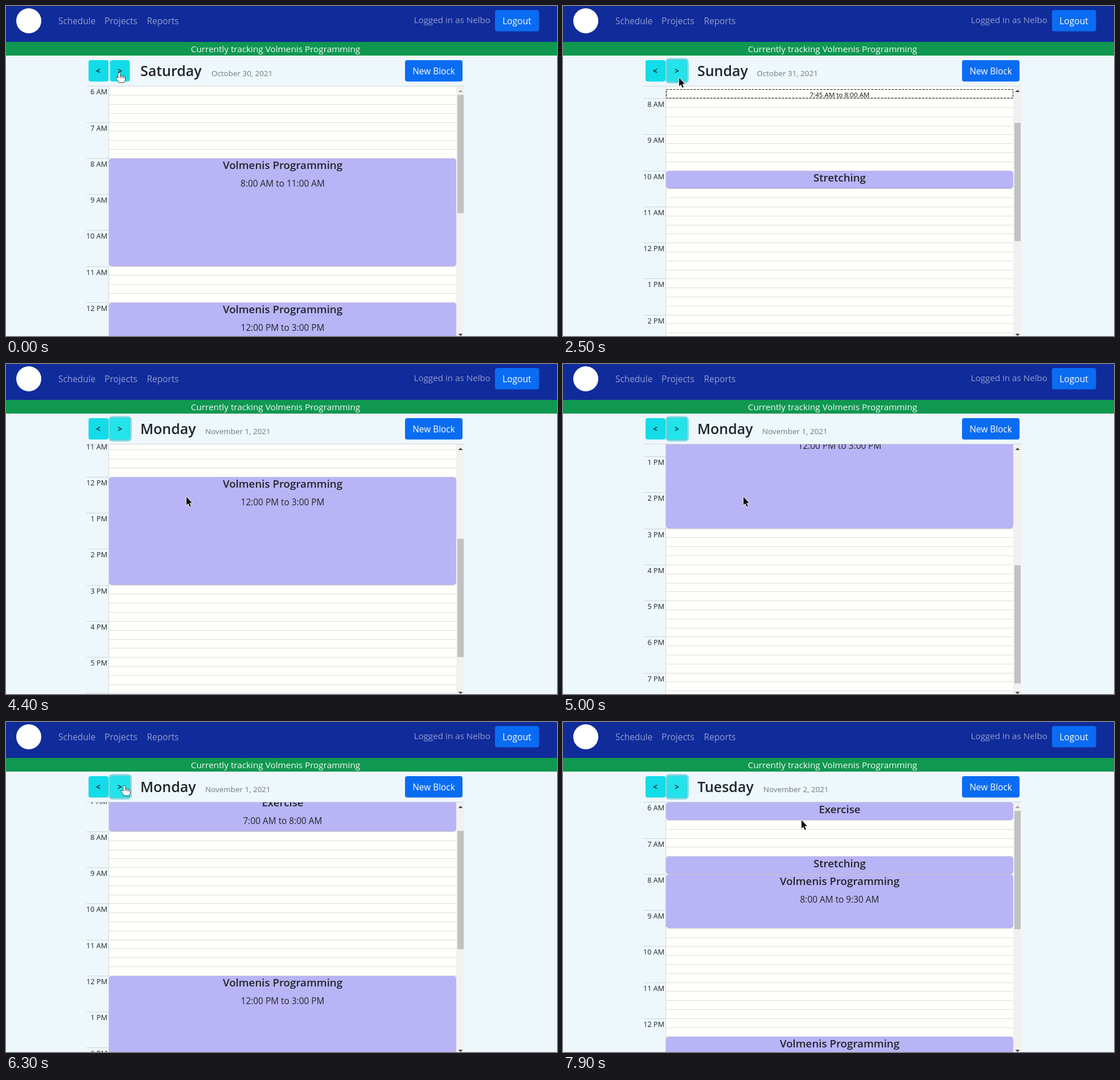
Animation of 968 by 579 pixels, one loop 8 s. Source, as an HTML page with a canvas:

```html
<!DOCTYPE html>
<html lang="en">
<head>
<meta charset="utf-8">
<title>Schedule</title>
<style>
html, body { margin: 0; width: 100%; height: 100%; overflow: hidden; background: #eef7fb; }
canvas { display: block; }
</style>
</head>
<body>
<canvas id="stage" width="968" height="579"></canvas>
<script>
const ctx = document.getElementById('stage').getContext('2d');
const LOOP = 8000, STEP = 100;
const TOP = 140.9, HOUR = 63.25, SLOT = HOUR / 4, LEFT = 181, RIGHT = 791, MID = 486;
const FONT = '"Open Sans", "Noto Sans", sans-serif';
const INK = '#212529', LINE = '#dcdedb';
const PROJECT = 'Volmenis Programming';

// Blocks are [title, first hour, last hour]
const days = [
  { name: 'Saturday', date: 'October 30, 2021', dateX: 361,
    blocks: [[PROJECT, 8, 11], [PROJECT, 12, 15]] },
  { name: 'Sunday', date: 'October 31, 2021', dateX: 340.5,
    blocks: [['Stretching', 10, 10.5]] },
  { name: 'Monday', date: 'November 1, 2021', dateX: 350,
    blocks: [['Exercise', 7, 8], [PROJECT, 12, 15]] },
  { name: 'Tuesday', date: 'November 2, 2021', dateX: 352,
    blocks: [['Exercise', 6, 6.5], ['Stretching', 7.5, 8], [PROJECT, 8, 9.5], [PROJECT, 12.5, 15]] }
];
const titleTimes = [0, 1500, 3600, 6500];
const gridTimes = [0, 1500, 3800, 6600];

const scrollKeys = [
  [0, 0], [2100, 0], [2900, 209.5], [4100, 209.5], [4400, 322], [4600, 443],
  [4900, 443], [5000, 421], [5600, 75], [6800, 75], [7300, 0]
];
// [time, x, y, hand]
const cursorKeys = [
  [0, 199, 117, 1], [2000, 204, 126], [3100, 283, 188], [3300, 262, 201],
  [3400, 205, 125], [3600, 203, 115, 1], [3800, 240, 119], [3900, 288, 190],
  [4000, 317, 233], [5700, 284, 160], [5800, 239, 115], [5900, 226, 117],
  [6000, 214, 114, 1], [6100, 208, 112, 1], [6600, 232, 128], [6700, 290, 180],
  [6800, 350, 232], [6900, 395, 268], [7000, 412, 282], [7500, 414, 266],
  [7600, 416, 250], [7800, 418, 212], [7900, 419, 172]
];

const clamp = v => Math.max(0, Math.min(1, v));
const held = (keys, t) => keys.filter(k => k[0] <= t).pop();
const current = (times, t) => days[times.filter(v => v <= t).length - 1];

function scrollAt(t) {
  const i = scrollKeys.findIndex(k => k[0] > t);
  if (i < 0) return 0;
  const [t0, a] = scrollKeys[i - 1], [t1, b] = scrollKeys[i];
  return a + (b - a) * (t - t0) / (t1 - t0);
}

function hoveredSlot(t, scroll) {
  if (t < 2000) return -1;
  if (t < 3300) return 1 + Math.round(12 * scroll / 209.5);
  if (t < 3400) return 18;
  if (t >= 4000 && t < 5700) {
    const slot = Math.floor((233 - TOP + scroll) / SLOT);
    return slot >= 24 && slot < 36 ? -1 : slot;
  }
  if (t >= 7600 && t < 7800) return 3;
  return t === 7800 ? 2 : -1;
}

function clock(hour) {
  const h = Math.floor(hour), min = Math.round((hour - h) * 60);
  return `${(h + 11) % 12 + 1}:${String(min).padStart(2, '0')} ${h < 12 ? 'AM' : 'PM'}`;
}

function text(str, x, y, size, color, align = 'left', weight = 400) {
  ctx.font = `${weight} ${size}px ${FONT}`;
  ctx.textAlign = align;
  ctx.fillStyle = color;
  ctx.fillText(str, x, y);
}

function rect(x, y, w, h, color) {
  ctx.fillStyle = color;
  ctx.fillRect(x, y, w, h);
}

function round(x, y, w, h, r, color) {
  ctx.beginPath();
  ctx.roundRect(x, y, w, h, r);
  ctx.fillStyle = color;
  ctx.fill();
}

function triangle(x, y, dir, color) {
  ctx.beginPath();
  ctx.moveTo(x - 4, y + 2 * dir);
  ctx.lineTo(x + 4, y + 2 * dir);
  ctx.lineTo(x, y - 2 * dir);
  ctx.fillStyle = color;
  ctx.fill();
}

function header(day, t) {
  rect(0, 0, 968, 63, '#102b9a');
  ctx.beginPath();
  ctx.arc(40, 26, 22, 0, Math.PI * 2);
  ctx.fillStyle = '#fff';
  ctx.fill();
  const link = '#929dd0';
  text('Schedule', 92, 31.5, 15.4, link);
  text('Projects', 173, 31.5, 15.6, link);
  text('Reports', 247.5, 31.5, 15.4, link);
  text('Logged in as Nelbo', 851, 29.5, 15.2, link, 'right');
  round(859, 7, 77.5, 37.5, 4, '#0a6cf2');
  text('Logout', 897.5, 31.5, 15.6, '#fff', 'center');

  rect(0, 63, 968, 24, '#109850');
  text('Currently tracking ' + PROJECT, 473.5, 80.5, 15.3, '#f4fbf7', 'center');

  const ring = clamp((t - 1200) / 200);
  const hover = clamp(t / 200);
  round(145, 95, 35, 37.5, 4, '#12dce8');
  if (ring) {
    ctx.globalAlpha = ring;
    round(180, 91.5, 41, 44.5, 7, '#82dbe4');
    ctx.globalAlpha = 1;
  }
  round(183, 95, 34.5, 37.5, 4, `rgb(${18 + 17 * hover},${220 + 7 * hover},${232 + 3 * hover})`);
  if (ring) {
    ctx.strokeStyle = `rgba(20,130,145,${0.45 * ring})`;
    ctx.lineWidth = 1;
    ctx.setLineDash([1, 1]);
    ctx.strokeRect(182.5, 94.5, 35, 38);
    ctx.setLineDash([]);
  }
  text('<', 162, 119, 14, '#111', 'center', 600);
  text('>', 200, 119, 14, '#111', 'center', 600);

  text(day.name, 236, 123, 25, INK, 'left', 600);
  text(day.date, day.dateX, 123, 13.45, '#707880');
  round(701, 95, 101, 37.5, 4, '#0a6cf2');
  text('New Block', 751.5, 119.5, 15.4, '#fff', 'center');
}

function block([title, from, to], scroll) {
  const y = TOP + (from - 6) * HOUR - scroll, h = (to - from) * HOUR;
  round(LEFT, y + 0.3, RIGHT - LEFT, h - 1, 5, '#9d99cb');
  round(LEFT, y + 0.3, RIGHT - LEFT, h - 1.8, 5, '#b9b4f6');
  text(title, MID, y + 19, 18.7, INK, 'center', 600);
  if (h > 40) text(`${clock(from)} to ${clock(to)}`, MID, y + 49.7, 15.4, INK, 'center');
}

function dashed(slot, scroll) {
  const y = Math.floor(TOP + slot * SLOT - scroll);
  rect(LEFT, y, RIGHT - LEFT, 16, '#fffffb');
  ctx.strokeStyle = '#111';
  ctx.lineWidth = 1;
  ctx.setLineDash([4, 2]);
  ctx.strokeRect(LEFT + 0.5, y + 0.5, RIGHT - LEFT - 1, 15);
  ctx.setLineDash([]);
  const from = 6 + slot / 4;
  text(`${clock(from)} to ${clock(from + 0.25)}`, MID, y + 14, 11.65, '#111', 'center');
}

function grid(day, t, scroll) {
  ctx.save();
  ctx.beginPath();
  ctx.rect(141, 141, 664, 438);
  ctx.clip();
  rect(LEFT, 141, RIGHT - LEFT, 438, '#fffffb');
  rect(180, 141, 1, 438, '#cfd7da');
  for (let i = 0; i < 56; i++) {
    const y = TOP + i * SLOT - scroll;
    if (y < 115 || y > 590) continue;
    rect(LEFT, Math.floor(y), RIGHT - LEFT, 1, LINE);
    if (i % 4) continue;
    const h = 6 + i / 4;
    rect(141, Math.floor(y), 39, 1, '#cfd7da');
    text(`${(h + 11) % 12 + 1} ${h < 12 ? 'AM' : 'PM'}`, 178, y + 14.5, 12.6, INK, 'right');
  }
  day.blocks.forEach(b => block(b, scroll));
  const slot = hoveredSlot(t, scroll);
  if (slot >= 0) dashed(slot, scroll);

  rect(RIGHT, 141, 14, 438, '#f1f1ef');
  rect(793, 156 + scroll * 0.468, 11, 207.5, '#c1c1bf');
  triangle(798.5, 149, 1, scroll ? '#454545' : '#a3a3a3');
  triangle(798.5, 577, -1, '#454545');
  ctx.restore();
  rect(141, 140, 664, 1, '#cfd7da');
}

const arrow = new Path2D('M0 0V14.8L3.3 11.8L5.8 17.6L8 16.6L5.6 10.8H10Z');
const hand = new Path2D('M-1.7 1.3C-1.7-.5 1.6-.5 1.6 1.3V6C2.2 5 4.6 5.3 4.8 6.6' +
  'C5.6 5.8 7.6 6.1 7.8 7.3C8.7 6.7 10 7.3 10 8.7V12C10 14 8.5 15 8.5 17H-.7' +
  'C-1 15-4 12.3-5.3 10.2C-6.2 8.5-4.3 7.4-3 8.7L-1.7 10Z');

function cursor([, x, y, isHand]) {
  ctx.save();
  ctx.translate(x, y);
  ctx.lineJoin = 'round';
  ctx.lineWidth = isHand ? 1.3 : 1.6;
  ctx.strokeStyle = isHand ? '#111' : '#fff';
  ctx.fillStyle = isHand ? '#fff' : '#111';
  const shape = isHand ? hand : arrow;
  ctx.stroke(shape);
  ctx.fill(shape);
  if (isHand) {
    ctx.lineWidth = 1;
    ctx.stroke(new Path2D('M1.7 6V9M4.8 7V9.5M7.8 7.6V10'));
  }
  ctx.restore();
}

function draw(now) {
  const t = Math.floor((now % LOOP) / STEP) * STEP;
  rect(0, 0, 968, 579, '#eef7fb');
  header(current(titleTimes, t), t);
  grid(current(gridTimes, t), t, scrollAt(t));
  cursor(held(cursorKeys, t));
}

const start = performance.now();
function frame() {
  draw(performance.now() - start);
  requestAnimationFrame(frame);
}
frame();
</script>
</body>
</html>
```
